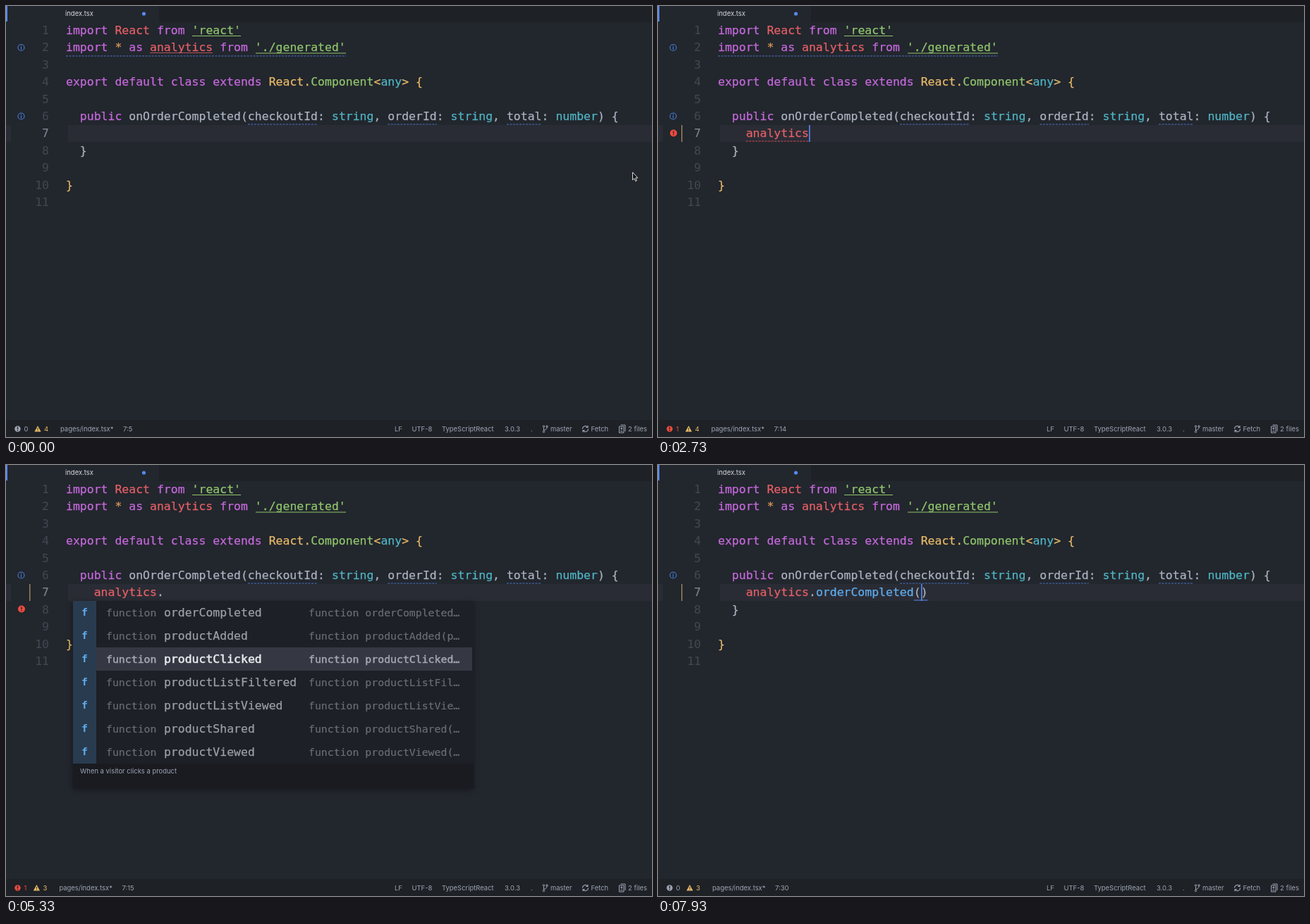
An HTML page with a canvas for the animation above (8000 ms loop, 916x612 px).

```html
<!DOCTYPE html>
<html lang="en">
<head>
<meta charset="utf-8">
<title>Editor autocomplete</title>
<style>
  html, body { margin: 0; width: 100%; height: 100%; overflow: hidden; background: #22262d; }
  canvas { display: block; width: 916px; height: 612px; }
</style>
</head>
<body>
<canvas id="stage" width="916" height="612"></canvas>
<script>
const ctx = document.getElementById('stage').getContext('2d');
const LOOP = 8000, CHAR = 9.92, LEFT = 85, LINE = 24.4;
const MONO = '"DejaVu Sans Mono", monospace', SANS = 'Inter, sans-serif';
const C = {
  bg: '#22262d', bar: '#1e2126', text: '#abb2bf', purple: '#c569dc', red: '#e45f66', green: '#90c56c',
  cyan: '#4fb5c3', yellow: '#e6b967', orange: '#d69759', blue: '#5fadee', accent: '#568af2', error: '#ee4b3e'
};

// Each token is [colour, text]; lines are listed by number.
const code = {
  1: [['purple', 'import '], ['red', 'React'], ['purple', ' from '], ['green', "'react'"]],
  2: [['purple', 'import '], ['orange', '*'], ['purple', ' as '], ['red', 'analytics'], ['purple', ' from '], ['green', "'./generated'"]],
  4: [['purple', 'export default class extends '], ['yellow', 'React.'], ['green', 'Component'], ['yellow', '<'],
      ['cyan', 'any'], ['yellow', '> {']],
  6: [['purple', '  public '], ['text', 'onOrderCompleted(checkoutId: '], ['cyan', 'string'], ['text', ', orderId: '],
      ['cyan', 'string'], ['text', ', total: '], ['cyan', 'number'], ['text', ') {']],
  8: [['text', '  }']],
  10: [['yellow', '}']]
};

// [time, text before the caret]
const typing = [[-900, ''], [1400, 'a'], [1530, 'an'], [1660, 'ana'], [1800, 'anal'],
  [2500, 'analytics'], [2880, 'analytics.'], [7450, 'analytics.orderCompleted(']];
const picks = [[0, 0], [4350, 1], [5270, 2], [6200, 1], [7000, 0]];
const symbols = ['analytics', 'AnalyserNode', 'AbortSignal', 'AnimationTimeline', 'AnimationPlaybackEvent', 'analytics'];
const calls = ['orderCompleted', 'productAdded', 'productClicked', 'productListFiltered', 'productListViewed',
  'productShared', 'productViewed'];
const notes = ['An order has been completed', 'A customer shares a product.', 'When a visitor clicks a product'];

const latest = (steps, t) => steps.filter(s => s[0] <= t).pop();
const baseline = n => 40 + (n - 1) * LINE;
const column = n => LEFT + n * CHAR;
const clip = s => s.slice(0, 23) + '…';

function rect(x, y, w, h, color) {
  ctx.fillStyle = color;
  ctx.fillRect(x, y, w, h);
}

function write(s, x, y, color, font, weight = 0, align = 'left') {
  ctx.font = font;
  ctx.textAlign = align;
  ctx.fillStyle = ctx.strokeStyle = color;
  ctx.fillText(s, x, y);
  if (weight) {
    ctx.lineWidth = weight;
    ctx.strokeText(s, x, y);
  }
}
const mono = (s, x, y, color, weight = .25, size = 16.48) => write(s, x, y, color, `${size}px ${MONO}`, weight);
const label = (s, x, y, color, weight) => mono(s, x, y, color, weight, 14.83);
const ui = (s, x, y, color = '#9da5b4') => write(s, x, y, color, `9.45px ${SANS}`);

function line(x1, x2, y, color, dash = []) {
  ctx.setLineDash(dash);
  path(`M${x1} ${y}H${x2}`, color);
  ctx.setLineDash([]);
}

function path(d, color, width = 1, x = 0, y = 0) {
  ctx.save();
  ctx.translate(x, y);
  ctx.strokeStyle = color;
  ctx.lineWidth = width;
  ctx.stroke(new Path2D(d));
  ctx.restore();
}

function disc(x, y, r, color) {
  ctx.fillStyle = color;
  ctx.beginPath();
  ctx.arc(x, y, r, 0, 7);
  ctx.fill();
}

function alertIcon(x, y, r, color) {
  disc(x, y, r, color);
  rect(x - .7, y - 3, 1.4, 3.6, C.bg);
  rect(x - .7, y + 1.5, 1.4, 1.4, C.bg);
}

function infoIcon(y) {
  path('M4.5 0A4.5 4.5 0 1 1-4.5 0A4.5 4.5 0 1 1 4.5 0M0-1V3M0-3V-1.8', '#4579cf', 1.2, 21.5, y);
}

function tokens(list, n, start = 0) {
  for (const [color, s] of list) {
    mono(s, column(start), baseline(n), C[color]);
    start += s.length;
  }
}

function drawEditor(state) {
  rect(0, 0, 916, 612, C.bg);
  rect(217, 0, 699, 23, C.bar);
  rect(0, 0, 2, 22, C.accent);
  ui('index.tsx', 84, 14, '#d7dae0');
  disc(195.5, 11, 2.6, C.accent);
  rect(0, 169, 7, 24, '#292c35');
  rect(88, 169, 828, 24, '#2a2c35');

  for (let n = 1; n <= 11; n++) {
    write(n, 61, baseline(n), n === 7 ? '#7d838e' : '#414650', `16.48px ${MONO}`, .15, 'right');
    if (code[n]) tokens(code[n], n);
  }
  line(264, 333, 42.5, C.green);
  line(354, 482, 67, C.green);
  if (!state.resolved) {
    infoIcon(59);
    line(85, 482, 71, '#4a72c0', [3, 1.5]);
  }
  if (!state.typed) line(204, 293, 66.5, '#b4535a');
  infoIcon(156.5);
  for (const [from, to] of [[26, 36], [46, 53], [63, 68]]) line(column(from), column(to), 168, '#4a72c0', [3, 1.5]);
}

function drawTypedLine({ t, typed, since, error, resolved, done }) {
  const [object, method = ''] = typed.split('.');
  tokens([['red', object], ['text', typed.includes('.') ? '.' : ''], ['blue', method.replace('(', '')],
    ['text', done ? '()' : '']], 7, 4);
  const caret = column(4 + typed.length);
  if (error) {
    alertIcon(22, resolved ? 204.5 : 180.5, 5, C.error);
    if (!resolved) line(column(4), caret, 192, '#c9484c', [3, 1.5]);
  }
  if (t > 1500) rect(33, 169, 1.5, 24, '#958456');
  if (done) line(caret - CHAR, caret + CHAR, 192, C.accent);
  // The caret rests for 300 ms after a key, then blinks.
  if (since < 300 || (since - 300) % 800 < 400) rect(Math.round(caret), 169, 1.6, 24, C.accent);
}

function drawPanel(x, w, h) {
  ctx.save();
  ctx.shadowColor = 'rgba(0,0,0,.4)';
  ctx.shadowBlur = 8;
  ctx.shadowOffsetY = 2;
  rect(x, 193, w, h, '#1d2026');
  ctx.restore();
}

function drawSymbols(typed) {
  drawPanel(24, 568, 198);
  symbols.forEach((name, i) => {
    const y = 193 + i * 33, first = !i;
    if (first) rect(57, y, 535, 33, '#353842');
    rect(24, y, 33, 33, first ? '#493756' : '#492f35');
    if (first) path('M0-6L7-4V4L0 6.5L-7 4V-4ZM-7-4L0-1.5L7-4M0-1.5V6.5M-3.5-5L3.5-2.7', C.purple, 1.1, 40, y + 16.5);
    else write('v', 40, y + 20.5, C.red, `bold 13.5px ${MONO}`, 0, 'center');

    if (i < 5) {
      const kind = first ? 'alias' : 'var';
      label(kind, 114 - kind.length * 8.93, y + 22, first ? '#878c96' : '#686d77');
      label(first ? 'import analytics' : clip(`interface ${name} var`), 360, y + 22, first ? '#a2a6af' : '#686d77', first ? .4 : .2);
    }
    let matched = 0;
    [...name].forEach((ch, k) => {
      const hit = matched < typed.length && ch.toLowerCase() === typed[matched];
      if (hit) matched++;
      write(ch, 124.7 + k * CHAR, y + 22, hit ? '#e9ebef' : first ? '#c8ccd4' : '#9a9fa9',
        `${hit ? 'bold ' : ''}16.48px ${MONO}`, hit ? 0 : .2);
    });
  });
}

function drawCalls(picked) {
  drawPanel(95, 567, 266);
  rect(95, 424, 569, 35, '#191b20');
  calls.forEach((name, i) => {
    const y = 193 + i * 33, on = i === picked;
    if (on) rect(128, y, 533, 33, '#353842');
    rect(95, y, 33, 33, '#293b4f');
    write('f', 111.5, y + 20.5, C.blue, `bold 14.8px ${MONO}`, 0, 'center');
    const dim = on ? '#a4a8b1' : '#686d77', weight = on ? .5 : .2;
    label('function', 142, y + 22, dim, weight);
    mono(name, 223.9, y + 22, on ? '#e6e8ec' : '#9a9fa9', on ? .6 : .25);
    label(clip(`function ${name}(props`), 429, y + 22, dim, weight);
  });
  ui(notes[picked], 105, 438);
}

function drawStatus({ typed, error, resolved }) {
  const y = 604, shift = error ? -1.6 : 0;
  rect(0, 588, 916, 24, C.bar);
  alertIcon(16.5, 600.5, 4.2, error ? C.error : '#9da5b4');
  ui(error ? 1 : 0, 25.5, y, error ? C.error : undefined);
  ctx.fillStyle = C.yellow;
  ctx.fill(new Path2D(`M${45 + shift} 596l4.6 8.5h-9.2z`));
  rect(44.5 + shift, 599, 1, 2.6, C.bar);
  rect(44.5 + shift, 602.4, 1, 1, C.bar);
  ui(resolved ? 3 : 4, 54 + shift, y, C.yellow);
  ui('pages/index.tsx*', 77 + shift, y);
  ui(`7:${5 + typed.length}`, 166 + shift, y);
  for (const [s, x] of [['LF', 551], ['UTF-8', 575.5], ['TypeScriptReact', 618], ['3.0.3', 707], ['.', 744],
    ['master', 772], ['Fetch', 829.5], ['2 files', 882]]) ui(s, x, y);
  path('M-2-2V3M2.5-2.5Q2.5 1-2 2M-3.2-3.5a1.2 1.2 0 1 0 2.4 0a1.2 1.2 0 1 0-2.4 0M1.3-3.5a1.2 1.2 0 1 0 2.4 0a1.2 1.2 0 1 0-2.4 0M-3.2 4a1.2 1.2 0 1 0 2.4 0a1.2 1.2 0 1 0-2.4 0',
    '#9da5b4', 1, 764.5, 600.5);
  path('M-4 0A4 4 0 0 1 3-2.7M3.5-4.8V-2H.7M4 0A4 4 0 0 1-3 2.7M-3.5 4.8V2H-.7', '#9da5b4', 1.1, 821.5, 600.5);
  path('M-2.5-5.5H4V3.5M-4.5-3.5H2V5.5H-4.5ZM-3-.5H.5M-1.2-2.3V1.3M-3 3.3H.5', '#9da5b4', 1, 874, 600.5);
}

function drawPointer() {
  const arrow = new Path2D('M888.5 236v11l2.4-2.2 1.8 4 1.7-.8-1.8-3.9h3.2z');
  ctx.fillStyle = '#111';
  ctx.fill(arrow);
  ctx.strokeStyle = '#d8d8d8';
  ctx.lineWidth = 1;
  ctx.stroke(arrow);
}

function draw(t) {
  const [typedAt, typed] = latest(typing, t);
  const state = {
    t, typed, since: t - typedAt,
    error: t >= 1700 && t < 7650,
    resolved: t >= 3700,
    done: t >= 7450
  };
  drawEditor(state);
  drawTypedLine(state);
  if (t >= 1600 && t < 2500) drawSymbols(typed);
  if (t >= 2950 && !state.done) drawCalls(latest(picks, t)[1]);
  drawStatus(state);
  if (!typed) drawPointer();
}

const start = performance.now();
function tick() {
  draw((performance.now() - start) % LOOP);
  requestAnimationFrame(tick);
}
tick();
</script>
</body>
</html>
```
